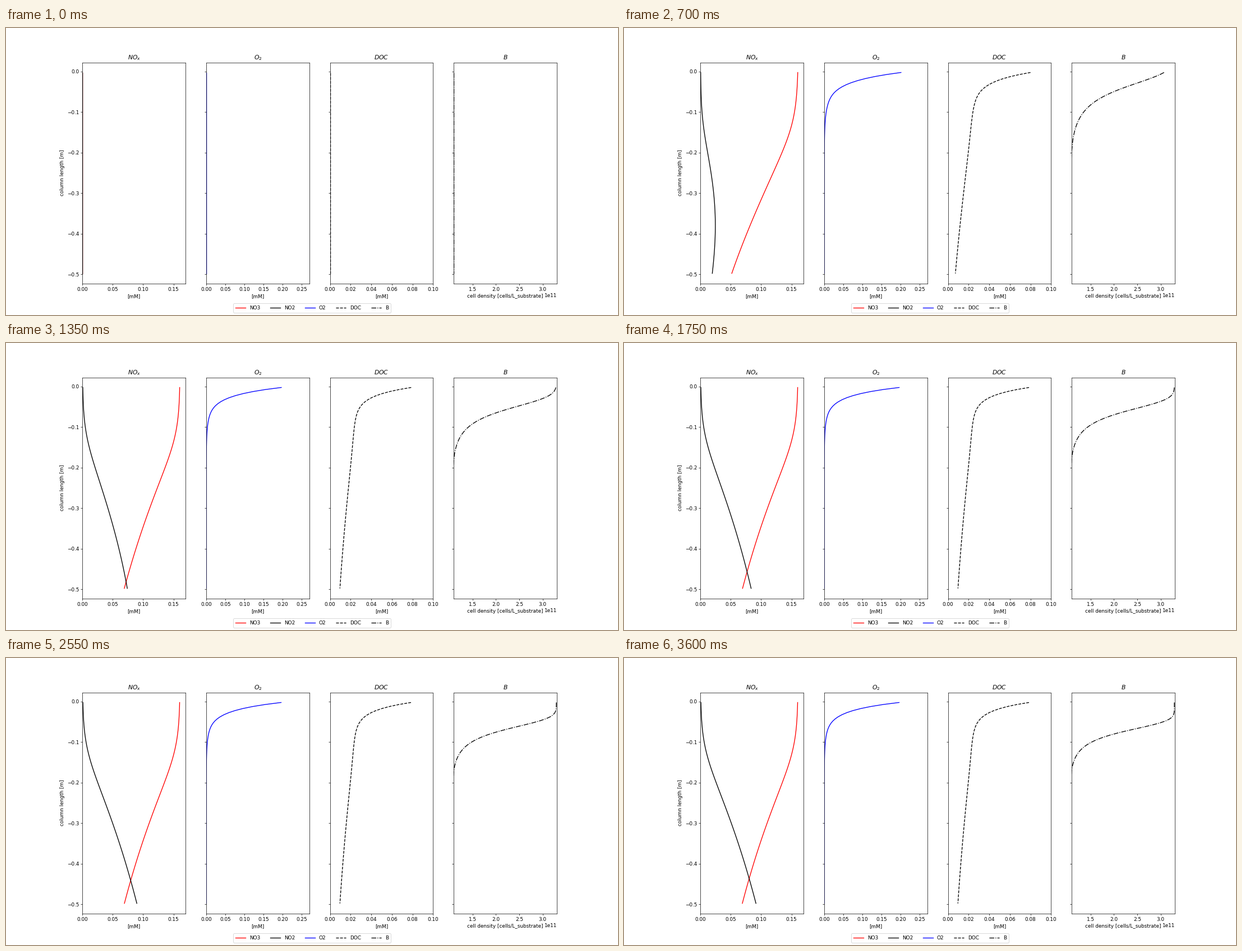
A matplotlib script that plays this animation: 1091x513 px, repeating every 3.65 s.

```python
import math

import numpy as np
import matplotlib.pyplot as plt
from matplotlib.animation import FuncAnimation

WIDTH, HEIGHT = 1091, 513
DPI = WIDTH / 17
FRAMES = 73
INTERVAL = 50

depth = 0.0025 + 0.005 * np.arange(100)
erfc = np.vectorize(math.erfc)

INLET_NOX = 0.1608
B_START, B_MAX = 1.1e11, 3.29e11


def soft_ramp(x, width):
    """Zero for negative x, then x itself, with a rounded knee."""
    return width * np.log1p(np.exp(x / width))


def front(t):
    """Share of the inlet water that has reached each depth."""
    def reach(d):
        return erfc((d - 0.0454 * t) / (0.0912 * math.sqrt(t)))
    return reach(depth) / reach(0.0)


def nitrate_loss(t):
    """Nitrate turned into nitrite below the oxygen zone."""
    start = 0.12 + 0.046 * math.exp(-t / 13)
    return 0.1967 * (1 - np.exp(-soft_ramp(depth - start, 0.04) / 0.6))


def oxygen(t):
    length = 0.0208 + 0.033 * math.exp(-t / 6)
    surface = 0.221 + 0.65 * (length - 0.0208)
    path = depth - 0.25 * soft_ramp(depth - 0.06, 0.01)
    return surface * np.exp(-path / length)


def biomass(t):
    """Logistic growth that slows down with depth."""
    power = np.maximum(1 - 7.2 * depth, -0.2)
    growth = 2.04 * np.exp(-depth / 0.0545) * (t / 8) ** power
    decay = 0.045 * (t / 8) ** 0.12
    return B_MAX / (1 + (B_MAX / B_START - 1) * np.exp(decay - growth))


def profiles(t):
    """NO3, NO2, O2, DOC and B over the depth at step t."""
    if t == 0:
        zero = np.zeros_like(depth)
        return zero, zero, zero, zero, zero + B_START
    wet = front(t)
    loss = nitrate_loss(t)
    built_up = 1 - math.exp(-0.078 * max(t - 2.7, 0))
    no3 = (INLET_NOX - loss) * wet
    no2 = loss * built_up * wet ** 3
    o2 = oxygen(t) * wet
    doc = (0.0236 - 0.152 * loss) * wet + 0.281 * o2
    return no3, no2, o2, doc, biomass(t)


# The tiny surplus keeps the pixel size from being rounded down.
fig, axes = plt.subplots(1, 4, sharey=True, dpi=DPI,
                         figsize=((WIDTH + 1e-6) / DPI, (HEIGHT + 1e-6) / DPI))

panels = [("$NO_x$", "[mM]", 0, 0.17),
          ("$O_2$", "[mM]", 0, 0.27),
          ("$DOC$", "[mM]", 0, 0.10),
          ("$B$", "cell density [cells/L_substrate]", 1.1e11, 3.3e11)]
for ax, (title, unit, low, high) in zip(axes, panels):
    ax.set_title(title)
    ax.set_xlabel(unit)
    ax.set_xlim(low, high)
axes[0].set_ylabel("column length [m]")
axes[0].set_ylim(-0.52225, 0.02225)

styles = [(0, "NO3", "red", "-"), (0, "NO2", "black", "-"), (1, "O2", "blue", "-"),
          (2, "DOC", "black", "--"), (3, "B", "black", "-.")]
lines = [axes[i].plot([], [], color=color, linestyle=dash, label=name)[0]
         for i, name, color, dash in styles]
fig.legend(handles=lines, loc="lower center", ncol=5)


def update(step):
    for line, values in zip(lines, profiles(step)):
        line.set_data(values, -depth)
    return lines


anim = FuncAnimation(fig, update, frames=FRAMES, interval=INTERVAL,
                     init_func=lambda: update(0), repeat=True, repeat_delay=0)
plt.show()
```
